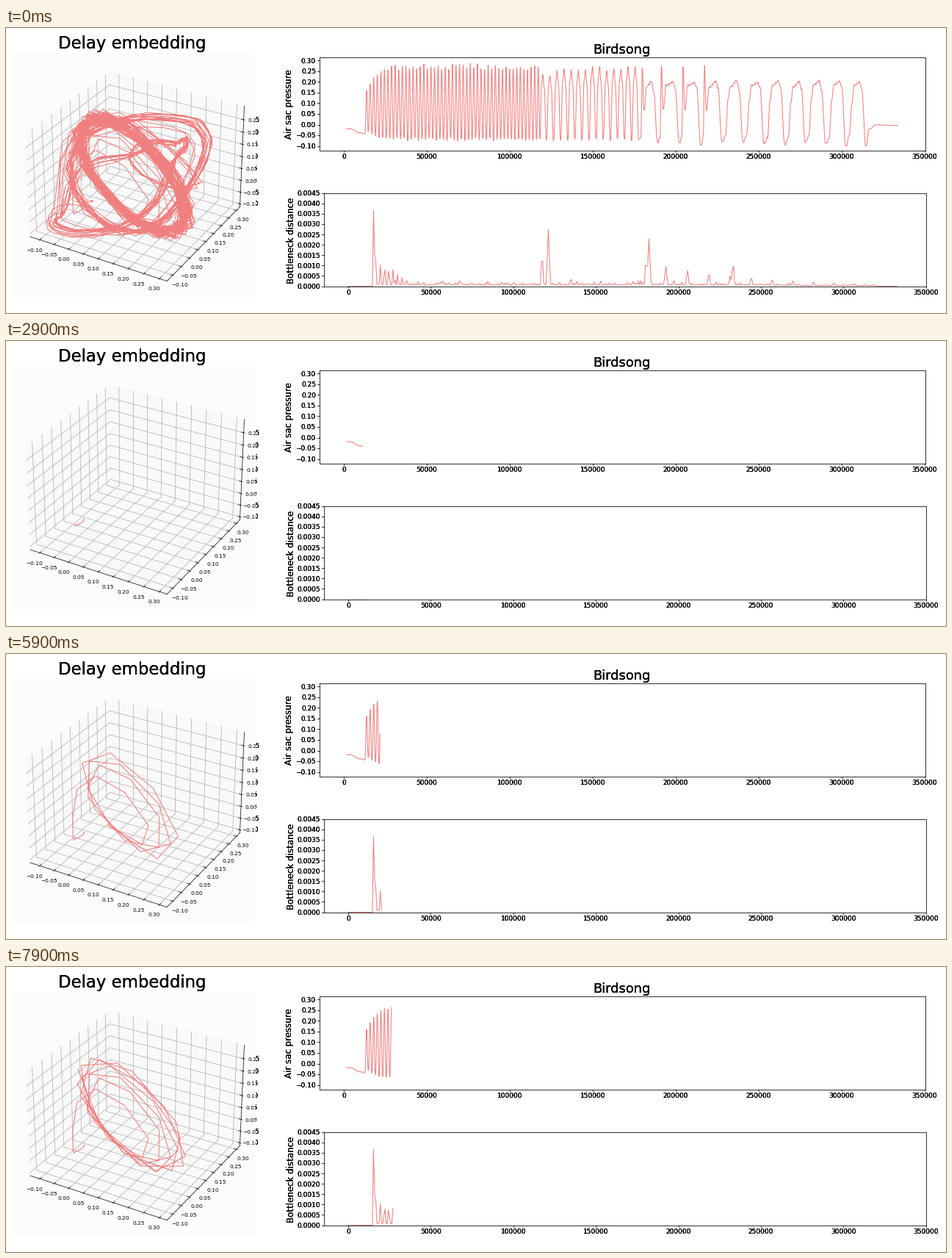
Animation, 1280 px wide and 388 px high, one loop 8000 ms. Source, as a matplotlib script:

```python
import numpy as np
import matplotlib.pyplot as plt
from matplotlib.animation import FuncAnimation
from matplotlib.patches import Polygon, Rectangle

W, H, DPI = 1280, 388, 100
PT = 72 / DPI               # one pixel in points
FRAMES, INTERVAL = 80, 100
CORAL = "#f08080"
N = 967                     # samples in the whole song
X0, DX = 463.5, 0.776       # stage x of a pressure sample
LAG = 1.65                  # embedding delay, in samples

plt.rcParams["font.family"] = "DejaVu Sans"
fig = plt.figure(figsize=(W / DPI, H / DPI), dpi=DPI, facecolor="white")
ax = fig.add_axes([0, 0, 1, 1])
ax.set_xlim(0, W)
ax.set_ylim(H, 0)
ax.axis("off")
rng = np.random.default_rng(4)


def text(x, y, s, size, copies=1, **kw):
    """Text on a baseline; several copies give a heavier edge."""
    kw = {"ha": "center", "va": "baseline", **kw}
    return [ax.text(x, y, s, fontsize=size * PT, color="black", **kw)
            for _ in range(copies)]


def line(xs, ys, color="black", width=0.7, **kw):
    return ax.plot(xs, ys, color=color, lw=width * PT, **kw)[0]


def number(v, digits):
    return f"{v:.{digits}f}".replace("-", "\u2212")


# --- 3D box -------------------------------------------------------------

LO = np.array([-0.134, -0.134, -0.1125])
HI = np.array([0.324, 0.324, 0.3042])
SIZE = np.array([4, 4, 3]) * 0.285715
CENTER, SCALE = (178.2, 195.5), 1868
RIGHT = np.array([0.8660, 0.5, 0])
UP = np.array([-0.25, 0.4330, 0.8660])
EYE = np.array([0.4330, -0.75, 0.5])


def project(pts):
    """Data points (n, 3) to stage x and y, seen from elev 30, azim -60."""
    d = ((np.asarray(pts, float) - LO) / (HI - LO) - 0.5) * SIZE
    depth = 10 - d @ EYE
    return (CENTER[0] + SCALE * (d @ RIGHT) / depth,
            CENTER[1] - SCALE * (d @ UP) / depth)


def corner(code):
    """Box corner from a code such as "010": 0 is low, 1 is high."""
    return [(LO, HI)[int(c)][i] for i, c in enumerate(code)]


def ticks(axis):
    return np.arange(-2, 6 if axis == 2 else 7) * 0.05


def grid_line(axis, value, a, b):
    """Line between two corners with one coordinate set to a value."""
    ends = [corner(a), corner(b)]
    for e in ends:
        e[axis] = value
    line(*project(ends), color="#b0b0b0", width=0.75)


def clip_area(x, width):
    area = Rectangle((x, 0), width, H, fc="none", ec="none")
    return ax.add_patch(area)


def draw_box():
    ax.add_patch(Rectangle((8, 34), 331, 332, fc="#fcfcfc", ec="none"))
    for pane in (("000", "100", "110", "010"), ("000", "010", "011", "001"),
                 ("010", "110", "111", "011")):
        xy = np.column_stack(project([corner(c) for c in pane]))
        ax.add_patch(Polygon(xy, fc="#f9f9f9", ec="none"))

    walls = [(("000", "010"), ("010", "011")),
             (("000", "100"), ("000", "001")),
             (("000", "010"), ("010", "110"))]
    for axis, sides in enumerate(walls):
        for v in ticks(axis):
            for a, b in sides:
                grid_line(axis, v, a, b)

    # edge, label offset and outward tick direction of each axis
    scales = [(("000", "100"), (-7, 13.5), (0, -1, 0)),
              (("100", "110"), (9.5, 12.5), (1, 0, 0)),
              (("110", "111"), (14, 0.3), (1, 0, 0))]
    inside, outside = clip_area(0, 339.5), clip_area(339.5, 60)
    for axis, ((a, b), shift, way) in enumerate(scales):
        line(*project([corner(a), corner(b)]))
        out = np.array(way) * (HI - LO) / 12
        for v in ticks(axis):
            base = np.array(corner(a))
            base[axis] = v
            line(*project([base + 0.1 * out, base - 0.2 * out]))
            px, py = project([base])
            x, y = px[0] + shift[0], py[0] + shift[1] + 2.7
            s = number(v, 2)
            if axis < 2:
                text(x, y, s, 7.4)
                continue
            # the panel edge cuts the label; a heavier copy goes on beyond it
            for t in text(x, y, s, 7.4, clip_on=True):
                t.set_clip_path(inside)
            for t in text(x - 1, y, s, 7.6, 4, clip_on=True):
                t.set_clip_path(outside)


# --- 2D axes ------------------------------------------------------------

def draw_axes(x0, x1, y0, y1, zero, step, yticks, ytop, ystep, digits):
    """Frame with x ticks every 50000 and y ticks downwards from ytop."""
    line([x0, x1, x1, x0, x0], [y0, y0, y1, y1, y0], width=0.8, zorder=3)
    for i in range(8):
        x = zero + i * step
        line([x, x], [y1, y1 + 2.6], width=0.8)
        text(x, y1 + 11.3, str(i * 50000), 8.95, 3)
    for i, v in enumerate(yticks):
        y = ytop + i * ystep
        line([x0 - 2.6, x0], [y, y], width=0.8)
        text(x0 - 4.6, y + 3.3, number(v, digits), 8.95, 3, ha="right")


def pressure_y(p):
    return 131.9 - 291.4 * p


def distance_y(d):
    return 351.5 - 28120 * d


# --- Signals ------------------------------------------------------------

k = np.arange(11)
SYLLABLES = np.append(861.4, 887.5 + 29.6 * k - 0.125 * k ** 2)


def jitter(size):
    return rng.uniform(-size, size)


def fast_trill():
    for i in range(49):
        x = 491 + 4.87 * i
        wild = min(i / 8, 1)
        yield x, 0.272 - 0.112 * np.exp(-i / 2.8) + jitter(0.016 * wild)
        yield x + 2.43, -0.068 + 0.038 * np.exp(-i / 2.5) + jitter(0.008 * wild)


def slow_trill():
    for i in range(14):
        x = 731 + 9.67 * i
        top = 0.265 - 0.04 * np.exp(-i / 2) + jitter(0.012)
        yield x - 1.9, 0.8 * top
        yield x, top
        yield x + 2, 0.74 * top
        yield x + 4.9, -0.07 + jitter(0.008)


def syllables():
    """Plateaus; the first few open with a sharp spike."""
    for i, (start, end) in enumerate(zip(SYLLABLES, SYLLABLES[1:])):
        if i < 4:
            yield start + 3, -0.06
            yield start + 5, 0.272 + jitter(0.005)
            yield start + 7.5, 0.07
        else:
            yield start + 4.5, -0.055 + jitter(0.01)
            yield start + 8, 0.11 + jitter(0.02)
        yield start + 11, 0.18 + jitter(0.008)
        yield end - 8.5, 0.203 + jitter(0.008)
        yield end - 5.5, 0.165 + jitter(0.01)
        yield end, -0.09 + jitter(0.012)


def song_keys():
    """Turning points (stage x, pressure) of the song."""
    intro = [(463, -0.018), (469, -0.018), (483, -0.037), (488.7, -0.042)]
    coda = [(1175, -0.02), (1184, 0), (1215, -0.003)]
    return np.array([*intro, *fast_trill(), *slow_trill(), *syllables(),
                     *coda])


KEYS = song_keys()


def pressure(t):
    """Pressure at sample t, eased between turning points, sharper on top."""
    x = X0 + DX * np.maximum(t, 0)
    i = np.clip(np.searchsorted(KEYS[:, 0], x) - 1, 0, len(KEYS) - 2)
    (xa, va), (xb, vb) = KEYS[i].T, KEYS[i + 1].T
    ease = (1 - np.cos(np.pi * (x - xa) / (xb - xa))) / 2
    rise = np.where(vb > va, ease, 1 - ease) ** 1.25
    noise = np.where((x > 870) & (x < 1166), 0.003, 0.0008)
    wobble = np.sin(2.1 * x) + 0.6 * np.sin(3.7 * x + 1)
    return np.minimum(va, vb) + np.abs(vb - va) * rise + noise * wobble


def distances():
    """Bottleneck distance: one point for every two samples."""
    j = np.arange(481)
    x = 466.2 + 1.556 * j
    d = 5e-5 + rng.exponential(5e-5, len(j))
    d *= 0.35 + 0.65 / (1 + np.exp((x - 1040) / 30))

    # ripple after the first onset
    ripple = np.clip(np.cos(2 * np.pi * (j - 24) / 3.8), 0, 1) ** 2
    d += 0.0011 * ripple * np.exp(-((j - 24) / 20) ** 4) * (j > 22)

    spikes = [(500.3, 0.00368), (730, 0.00138), (738.5, 0.00275),
              (871.5, 0.00115), (875.5, 0.0023), (990, 0.00102)]
    spikes += [(e + 11, 0.00095 * np.exp(-i / 4.5))
               for i, e in enumerate(SYLLABLES[1:-1])]
    for at, height in spikes:
        shape = np.clip(1.25 - np.abs(x - at) / 2, 0, 1)
        d = np.maximum(d, height * shape)
    d[(x < 499) | (x > 1186)] = 0
    return x, distance_y(d)


t = np.arange(N + 1)
cloud = project(np.column_stack([pressure(t - m * LAG) for m in (2, 1, 0)]))
fine = np.arange(2 * N + 1) / 2
song = X0 + DX * fine, pressure_y(pressure(fine))
bottleneck = distances()

# --- Scene --------------------------------------------------------------

draw_box()
text(172.2, 28.2, "Delay embedding", 22.8, 3)
text(838.3, 35, "Birdsong", 17.8, 3)
draw_axes(426.5, 1251.5, 39.5, 166.5, 460, 113, np.arange(6, -3, -1) * 0.05,
          44.2, 14.57, 2)
draw_axes(432.5, 1252.5, 224.5, 351.5, 466, 112.4,
          np.arange(9, -1, -1) * 0.0005, 225, 14.06, 4)
side = dict(rotation=90, rotation_mode="anchor")
text(389.5, 103.5, "Air sac pressure", 11.8, 3, **side)
text(392, 289, "Bottleneck distance", 11.7, 3, **side)

style = dict(color=CORAL, width=1.05, solid_joinstyle="round")
cloud_line, song_line, dist_line = (line([], [], **style) for _ in range(3))


def show(artist, data, count):
    artist.set_data(data[0][:count], data[1][:count])


def draw(n):
    last = n if n else N        # the loop opens on the finished traces
    show(cloud_line, cloud, last + 1)
    show(song_line, song, 2 * last + 1)
    show(dist_line, bottleneck, last // 2 + 1)
    return cloud_line, song_line, dist_line


anim = FuncAnimation(fig, draw, frames=FRAMES, interval=INTERVAL,
                     init_func=lambda: draw(0), repeat=True, blit=False)
plt.show()
```
